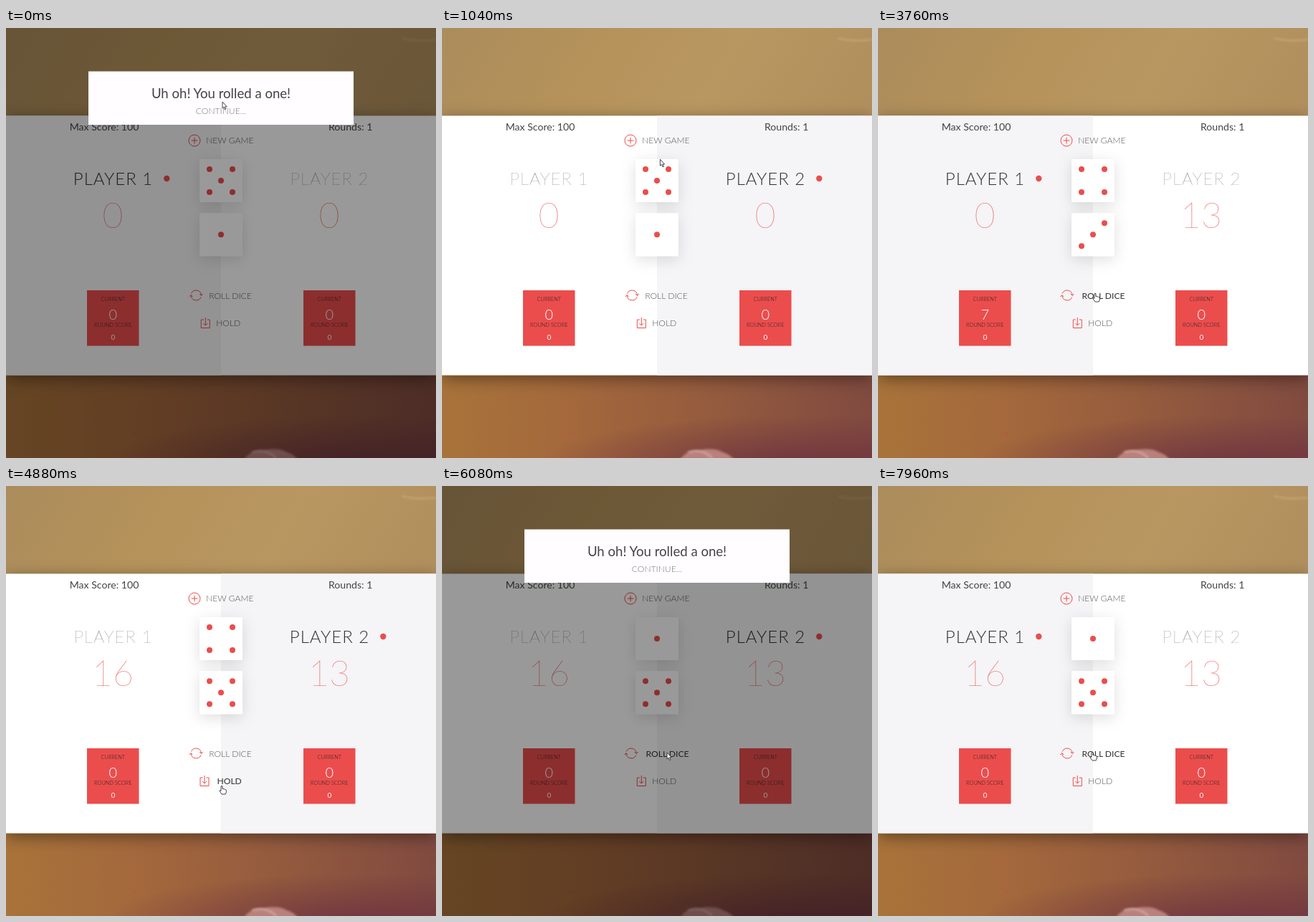
Recreate the animation shown at these times as an HTML page. Size 600 px wide and 600 px high, loop 8000 ms.

```html
<!DOCTYPE html>
<html lang="en">
<head>
<meta charset="utf-8">
<title>Dice game</title>
<style>
  html, body { margin: 0; width: 100%; height: 100%; overflow: hidden; background: #a9824f; }
  svg { display: block; width: 100vw; height: 100vh; }
  text { font-family: Lato, "Open Sans", sans-serif; font-weight: 300; fill: #444; }
  .info, .title { font-weight: 400; font-size: 14.1px; }
  .title { font-size: 18.6px; }
  .button text { font-size: 12.1px; fill: #555; }
  .button.hover text { font-weight: 400; fill: #333; }
  .icon { fill: none; stroke: #eb4d4d; stroke-width: 1; }
  .name { font-size: 24px; letter-spacing: 1px; font-weight: 100; fill: #555; }
  .active .name { font-weight: 300; fill: #333; }
  .score { font-size: 50px; font-weight: 100; fill: #eb4d4d; }
  .label { font-size: 7.4px; fill: #222; }
  .current { font-size: 20px; fill: #fff; }
  .round { font-size: 10px; fill: #fff; font-weight: 400; }
  .red { fill: #eb4d4d; }
  .middle { text-anchor: middle; }
</style>
</head>
<body>
<svg id="stage" viewBox="0 0 600 600" xmlns="http://www.w3.org/2000/svg">
  <defs>
    <linearGradient id="wall" x2="1" y2=".3">
      <stop offset="0" stop-color="#ab8c5c"/>
      <stop offset=".35" stop-color="#b5925a"/>
      <stop offset=".65" stop-color="#b99761"/>
      <stop offset="1" stop-color="#b18f5d"/>
    </linearGradient>
    <linearGradient id="table">
      <stop offset="0" stop-color="#a8733a"/>
      <stop offset=".3" stop-color="#a4683c"/>
      <stop offset=".65" stop-color="#935a3e"/>
      <stop offset="1" stop-color="#804a40"/>
    </linearGradient>
    <radialGradient id="wine" cx=".82" cy="1.1" r=".6">
      <stop offset="0" stop-color="#6b2f40" stop-opacity=".85"/>
      <stop offset="1" stop-color="#6b2f40" stop-opacity="0"/>
    </radialGradient>
    <filter id="panelShadow" x="-20%" y="-20%" width="140%" height="140%">
      <feDropShadow dx="0" dy="5" stdDeviation="11" flood-opacity=".42"/>
    </filter>
    <filter id="dieShadow" x="-60%" y="-60%" width="220%" height="220%">
      <feDropShadow dx="0" dy="5" stdDeviation="10" flood-opacity=".13"/>
    </filter>
    <filter id="soft" x="-50%" y="-50%" width="200%" height="200%"><feGaussianBlur stdDeviation="1.5"/></filter>
  </defs>

  <rect width="600" height="300" fill="url(#wall)"/>
  <rect y="300" width="600" height="300" fill="url(#table)"/>
  <rect y="480" width="600" height="120" fill="url(#wine)"/>
  <path d="M552 14Q575 20 600 16" fill="none" stroke="#d0b78c" stroke-width="3" opacity=".4" filter="url(#soft)"/>
  <path d="M332 602Q342 588 360 589Q380 585 392 592Q402 595 407 602Z" fill="#b9807c" filter="url(#soft)"/>
  <path d="M343 592Q364 586 377 600" fill="none" stroke="#d8b0a8" stroke-width="3" opacity=".7" filter="url(#soft)"/>
  <circle cx="180" cy="566" r="2" fill="#b9534a" opacity=".5"/>

  <rect y="122.5" width="600" height="362" fill="#fff" filter="url(#panelShadow)"/>
  <rect id="half" y="122.5" width="300" height="362" fill="#f5f4f6"/>
  <text class="info middle" x="137" y="143.2">Max Score: 100</text>
  <text class="info middle" x="480.7" y="143.2">Rounds: 1</text>
  <g id="players"></g>
  <g id="dice"></g>
  <g id="buttons"></g>

  <g id="modal">
    <rect width="600" height="600" fill="#000" opacity=".4"/>
    <rect x="115" y="60.5" width="370" height="74.5" fill="#fffdff"/>
    <text class="title middle" x="300" y="97.7">Uh oh! You rolled a one!</text>
    <text id="continue" class="middle" x="300" y="120" font-size="12.1">CONTINUE...</text>
  </g>

  <g id="cursor" fill="#fff" stroke="#333" stroke-width=".9" stroke-linejoin="round">
    <path id="arrow" d="M0 0V9L2 7.2L3.6 10.6L5 10L3.5 6.8H6.2Z"/>
    <path id="hand" d="M0 1Q1 -.6 2 1V4.6Q3.2 3.8 4 5Q5.2 4.4 5.8 5.6Q7.2 5.2 7.4 6.8V9L6.2 12H1L-1.8 8Q-2.4 6.4 -.9 6.6L0 7.4Z"/>
  </g>
</svg>
<script>
const LOOP = 8000;
const $ = id => document.getElementById(id);
const show = (el, on) => el.setAttribute("display", on ? "inline" : "none");

// Each entry changes some of the game state at its time.
const events = [
  [0, { active: 0, scores: [0, 0], current: 0, dice: [5, 1], modal: true }],
  [800, { active: 1, modal: false }],
  [1600, { dice: [4, 5], current: 9 }],
  [1960, { dice: [2, 2], current: 13 }],
  [2800, { active: 0, scores: [0, 13], current: 0 }],
  [3600, { dice: [4, 3], current: 7 }],
  [4080, { dice: [4, 5], current: 16 }],
  [4800, { active: 1, scores: [16, 13], current: 0 }],
  [5960, { dice: [1, 5], modal: true }],
  [7120, { active: 0, modal: false }]
];

// Cursor tip: time, x, y
const track = [
  [0, 302, 103], [150, 302, 103], [500, 303, 111], [850, 303, 111],
  [1400, 308, 371], [2300, 308, 371], [2650, 300, 418], [2950, 300, 418],
  [3350, 302, 370], [4250, 302, 370], [4600, 300, 418], [5000, 300, 418],
  [5500, 314, 372], [6300, 314, 372], [6850, 304, 111], [7180, 304, 111],
  [7700, 298, 371], [8000, 298, 371]
];

const buttons = [
  { label: "NEW GAME", x: 279.2, y: 161.3, iconX: 263, iconY: 157,
    icon: "M-8 0A8 8 0 1 1 8 0A8 8 0 1 1 -8 0M-4.3 0H4.3M0 -4.3V4.3" },
  { label: "ROLL DICE", x: 283.2, y: 377.7, iconX: 265.3, iconY: 373,
    icon: "M-6.8 -2.5A7.3 7.3 0 0 1 7.2 0M6.8 2.5A7.3 7.3 0 0 1 -7.2 0M4.9 -2L7.2 .5L9.5 -2M-9.5 2L-7.2 -.5L-4.9 2" },
  { label: "HOLD", x: 293.2, y: 416.4, iconX: 278.3, iconY: 412,
    icon: "M-2.5 -5H-6V6.5H6V-5H2.5M0 -8V3M-3 0L0 3L3 0" }
];

$("buttons").innerHTML = buttons.map(b =>
  `<g class="button"><path class="icon" d="${b.icon}"/><text y="${b.y}">${b.label}</text></g>`).join("");

$("players").innerHTML = [149, 451].map((x, i) => `<g>
  <text class="name middle" x="${x + .5}" y="218.6">PLAYER ${i + 1}</text>
  <circle class="dot red" cx="${x + 75.3}" cy="210" r="4.2"/>
  <text class="score middle" x="${x}" y="279"></text>
  <rect class="red" x="${x - 36}" y="366" width="72.5" height="77.5"/>
  <text class="label middle" x="${x + .3}" y="380.8">CURRENT</text>
  <text class="current middle" x="${x + .3}" y="407"></text>
  <text class="label middle" x="${x + .3}" y="417.4">ROUND SCORE</text>
  <text class="round middle" x="${x + .3}" y="434.7">0</text></g>`).join("");

$("dice").innerHTML = [183, 258.3].map(y =>
  `<g transform="translate(270 ${y})"><rect width="60" height="60" rx="1" fill="#fff" filter="url(#dieShadow)"/><g class="red"></g></g>`).join("");

function pips(n) {
  const spots = [];
  if (n % 2) spots.push([0, 0]);
  if (n > 1) spots.push([-1, 1], [1, -1]);
  if (n > 3) spots.push([-1, -1], [1, 1]);
  if (n > 5) spots.push([-1, 0], [1, 0]);
  return spots.map(([x, y]) => `<circle cx="${30 + 16 * x}" cy="${30 + 16 * y}" r="4"/>`).join("");
}

const stateAt = t => Object.assign({}, ...events.filter(e => e[0] <= t).map(e => e[1]));

function cursorAt(t) {
  const i = track.findIndex(p => p[0] > t);
  const [t0, x0, y0] = track[i - 1], [t1, x1, y1] = track[i];
  const k = (t - t0) / (t1 - t0), e = k * k * (3 - 2 * k);
  return [x0 + (x1 - x0) * e, y0 + (y1 - y0) * e];
}

function drawState(s) {
  $("half").setAttribute("x", 300 * s.active);
  [...$("players").children].forEach((g, i) => {
    const on = i === s.active;
    g.setAttribute("class", on ? "active" : "");
    show(g.querySelector(".dot"), on);
    g.querySelector(".score").textContent = s.scores[i];
    g.querySelector(".current").textContent = on ? s.current : 0;
  });
  [...$("dice").children].forEach((g, i) => { g.lastElementChild.innerHTML = pips(s.dice[i]); });
  show($("modal"), s.modal);
}

function drawPointer(s, [x, y]) {
  const onContinue = s.modal && y > 107 && y < 124;
  let pointing = onContinue;
  [...$("buttons").children].forEach((g, i) => {
    const b = buttons[i];
    // The roll button keeps its highlight while the dialog opens over it.
    const over = Math.abs(y - b.iconY - 1) < 11 && (!s.modal || i === 1);
    const shift = over ? 1.3 : 0;
    pointing = pointing || (over && !s.modal);
    g.setAttribute("class", over ? "button hover" : "button");
    g.firstElementChild.setAttribute("transform", `translate(${b.iconX - shift} ${b.iconY})`);
    g.lastElementChild.setAttribute("x", b.x + shift);
  });
  $("continue").style.fill = onContinue ? "#444" : "#777";
  show($("hand"), pointing);
  show($("arrow"), !pointing);
  $("cursor").setAttribute("transform", `translate(${x} ${y})`);
}

function tick() {
  const t = performance.now() % LOOP;
  const state = stateAt(t);
  drawState(state);
  drawPointer(state, cursorAt(t));
  requestAnimationFrame(tick);
}
tick();
</script>
</body>
</html>
```
